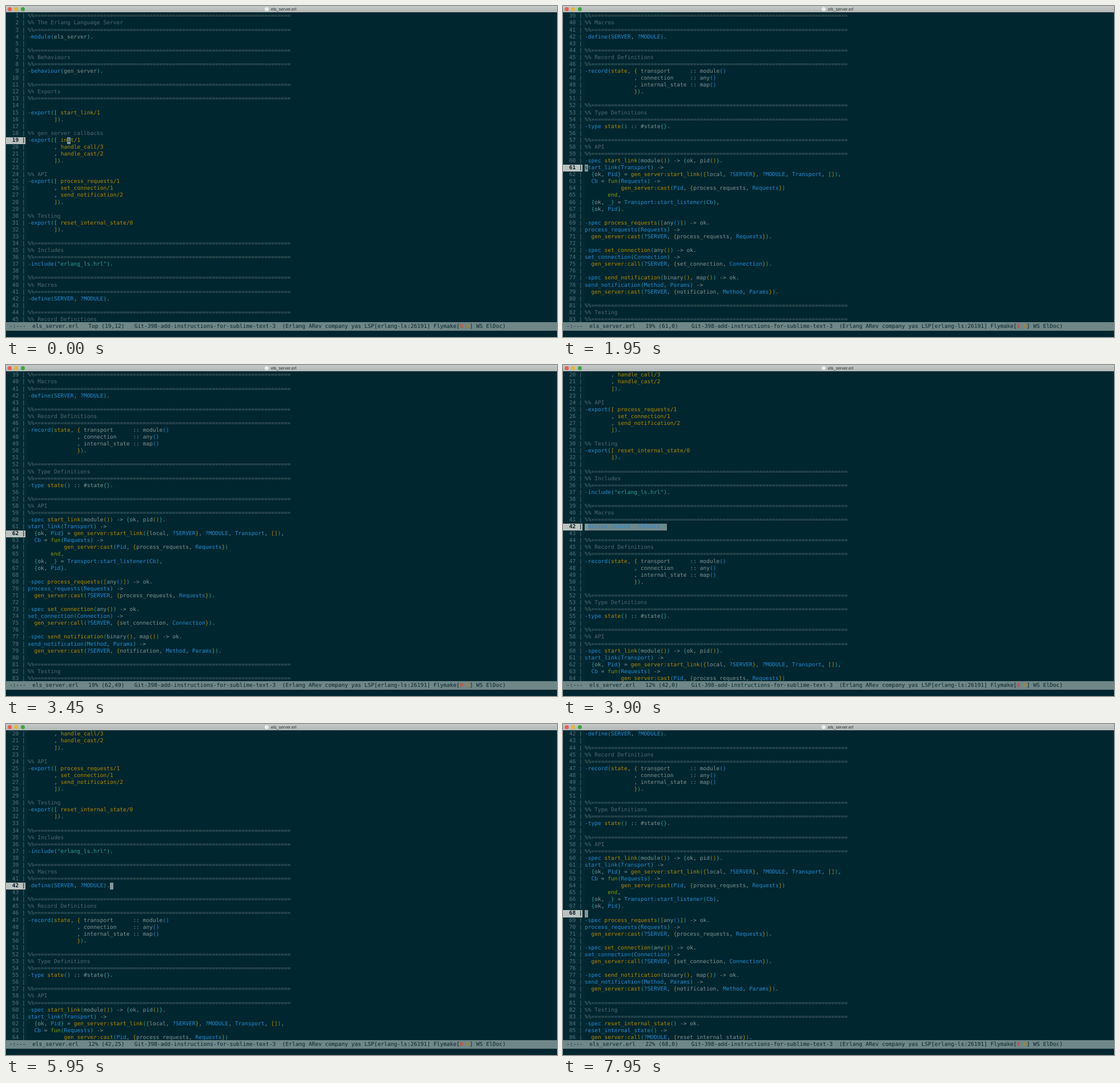
Animation, 965 px wide and 580 px high, one loop 8 s. Source, as an HTML page:

```html
<!DOCTYPE html>
<html lang="en">
<head>
<meta charset="utf-8">
<title>els_server.erl</title>
<style>
:root {
  --cw: 5.762px; --lh: 12.08px;
  --bg: #00262f; --edge: #032a33; --grey: #7f9394; --dim: #506a70;
  --blue: #268bd2; --yellow: #b58900; --cyan: #2aa198; --green: #859900;
}
html, body { margin: 0; width: 100%; height: 100%; overflow: hidden; background: var(--bg); }
#stage {
  position: relative; width: 965px; height: 580px; overflow: hidden;
  background: var(--bg); color: var(--grey);
  font: 9.57px/var(--lh) "DejaVu Sans Mono", monospace;
  font-variant-ligatures: none; text-rendering: geometricPrecision; white-space: pre;
}
#stage div { position: absolute; }
#bar { left: 0; top: 0; width: 965px; height: 11px; background: linear-gradient(#c6cac8, #b1b8b6); }
#bar i { position: absolute; top: 2px; width: 7px; height: 7px; border-radius: 50%; }
#bar b { position: absolute; left: 464px; top: 0; font: 7.5px/11px "Liberation Sans", Arial, sans-serif; color: #2d3335; }
#view { left: 0; top: 12.4px; width: 965px; height: 542px; overflow: hidden; }
.fringe { top: 11px; height: 543px; background: var(--edge); }
#page { left: 0; width: 965px; }
.num { left: 10.8px; color: #5a7278; }
.row { left: 38px; }
#pulse { left: 38px; height: var(--lh); background: #708789; }
#here { left: 0; width: 23.1px; height: var(--lh); padding-left: 10.8px; background: #bac2c0; color: #0a1a1e; font-weight: bold; }
#cursor { width: var(--cw); height: var(--lh); background: #839698; color: var(--bg); }
#mode { left: 0; top: 554px; width: 959px; height: 14.5px; padding-left: 6px; line-height: 15px; background: #6f8788; color: #06262e; }
.dim { color: var(--dim); } .blue { color: var(--blue); } .yellow { color: var(--yellow); }
.cyan { color: var(--cyan); } .green { color: var(--green); }
</style>
</head>
<body>
<div id="stage">
  <div class="fringe" style="left:0;width:38px"></div>
  <div class="fringe" style="left:961px;width:4px"></div>
  <div id="view"><div id="page"><div id="pulse"></div></div></div>
  <div id="bar"><i style="left:2.5px;background:#ee5b52"></i><i style="left:14.2px;background:#e5b536"></i><i style="left:25.8px;background:#38a83c"></i><i style="left:453px;background:#e9eceb"></i><b>els_server.erl</b></div>
  <div id="mode">-:---  els_server.erl   <span id="pos"></span>   Git-398-add-instructions-for-sublime-text-3  (Erlang ARev company yas LSP[erlang-ls:26191] Flymake[<b style="color:#e0432f">0</b> <b style="color:#b58225">0</b>] WS ElDoc)</div>
</div>
<script>
// A line starting with "#" stands for a three-line section heading.
const source = `# The Erlang Language Server
-module(els_server).

# Behaviours
-behaviour(gen_server).

# Exports

-export([ start_link/1
        ]).

%% gen_server callbacks
-export([ init/1
        , handle_call/3
        , handle_cast/2
        ]).

%% API
-export([ process_requests/1
        , set_connection/1
        , send_notification/2
        ]).

%% Testing
-export([ reset_internal_state/0
        ]).

# Includes
-include("erlang_ls.hrl").

# Macros
-define(SERVER, ?MODULE).

# Record Definitions
-record(state, { transport      :: module()
               , connection     :: any()
               , internal_state :: map()
               }).

# Type Definitions
-type state() :: #state{}.

# API
-spec start_link(module()) -> {ok, pid()}.
start_link(Transport) ->
  {ok, Pid} = gen_server:start_link({local, ?SERVER}, ?MODULE, Transport, []),
  Cb = fun(Requests) ->
           gen_server:cast(Pid, {process_requests, Requests})
       end,
  {ok, _} = Transport:start_listener(Cb),
  {ok, Pid}.

-spec process_requests([any()]) -> ok.
process_requests(Requests) ->
  gen_server:cast(?SERVER, {process_requests, Requests}).

-spec set_connection(any()) -> ok.
set_connection(Connection) ->
  gen_server:call(?SERVER, {set_connection, Connection}).

-spec send_notification(binary(), map()) -> ok.
send_notification(Method, Params) ->
  gen_server:cast(?SERVER, {notification, Method, Params}).

# Testing
-spec reset_internal_state() -> ok.
reset_internal_state() ->
  gen_server:call(?MODULE, {reset_internal_state}).`;

const rule = "%%" + "=".repeat(78);
const lines = source.split("\n").flatMap(s =>
  s.startsWith("# ") ? [rule, "%%" + s.slice(1), rule] : [s]);

const CW = 5.762, LH = 12.08, LEFT = 38, LOOP = 8000;
const $ = id => document.getElementById(id);
const page = $("page"), pulse = $("pulse"), pos = $("pos");

function add(cls, id = "") {
  const el = document.createElement("div");
  el.className = cls;
  el.id = id;
  page.append(el);
  return el;
}

const syntax = new RegExp([
  "(?<dim>^%.*)",
  "(?<cyan>\"[^\"]*\")",
  "(?<yellow>(?<=^-(?:spec|type) |^-record\\()\\w+|\\b[a-z]\\w*(?::\\w+|\\/\\d))",
  "(?<green>\\b(?:fun|end)\\b)",
  "(?<blue>^-?[a-z]\\w*|\\?[A-Z]+|\\b[A-Z]\\w*(?::\\w+)?|\\b_\\b)",
  "(?<open>[(\\[{])",
  "(?<close>[)\\]}])",
  "(?<word>\\w+|.)"
].join("|"), "g");

const depthColours = ["cyan", "yellow", "blue"];
let depth = 0;

function paint(row, text) {
  for (const m of text.matchAll(syntax)) {
    let kind = Object.keys(m.groups).find(k => m.groups[k] !== undefined);
    if (kind === "open") kind = depthColours[depth++ % 3];
    else if (kind === "close") kind = depthColours[--depth % 3];
    const span = document.createElement("span");
    span.className = kind;
    span.textContent = m[0];
    row.append(span);
  }
}

const label = n => String(n).padStart(2) + " |";
lines.forEach((text, i) => {
  const num = add("num"), row = add("row");
  num.style.top = row.style.top = i * LH + "px";
  num.textContent = label(i + 1);
  paint(row, text);
});
const here = add("", "here"), cursor = add("", "cursor");

// Cursor moves: time, line, goal column, and whether it is a jump to a definition.
const moves = [];
const move = (at, line, col, jump = false) =>
  moves.push({ at, line, col: Math.min(col, lines[line - 1].length), jump });

move(0, 19, 12);
for (let n = 18; n >= 15; n--) move(200 + (18 - n) * 120, n, 12);
move(940, 61, 0, true);
move(2050, 62, 0);
move(2120, 62, 1);
for (let c = 2; c <= 49; c++) move(2336 + (c - 2) * 12, 62, c);
move(3890, 42, 0, true);
move(4400, 42, 0);
move(5800, 42, 99);
move(6480, 43, 99);
for (let n = 44; n <= 68; n++) move(6630 + (n - 44) * 35, n, 99);

// Re-centre the window after a jump or when the cursor leaves it.
let firstLine = 1;
for (const m of moves) {
  if (m.jump || m.line < firstLine || m.line > firstLine + 43) firstLine = m.line - 22;
  m.firstLine = firstLine;
}
const percent = { 1: "Top", 39: "19%", 20: "12%", 42: "22%" };

function draw() {
  const t = performance.now() % LOOP;
  const m = moves.findLast(e => e.at <= t);
  const idle = t - m.at;
  const text = lines[m.line - 1];
  const glow = m.jump ? Math.max(0, 1 - Math.floor(idle / 35) / 10) : 0;

  page.style.top = (1 - m.firstLine) * LH + "px";
  here.style.top = cursor.style.top = pulse.style.top = (m.line - 1) * LH + "px";
  here.textContent = label(m.line);

  cursor.style.left = LEFT + m.col * CW + "px";
  cursor.style.visibility = idle % 1000 < 500 ? "visible" : "hidden";
  cursor.style.color = glow > 0.5 ? "#708789" : "";
  cursor.textContent = text[m.col] || " ";

  pulse.style.width = text.length * CW + "px";
  pulse.style.opacity = glow;

  pos.textContent = `${percent[m.firstLine]} (${m.line},${m.col})`.padEnd(11);
  requestAnimationFrame(draw);
}
draw();
</script>
</body>
</html>
```
